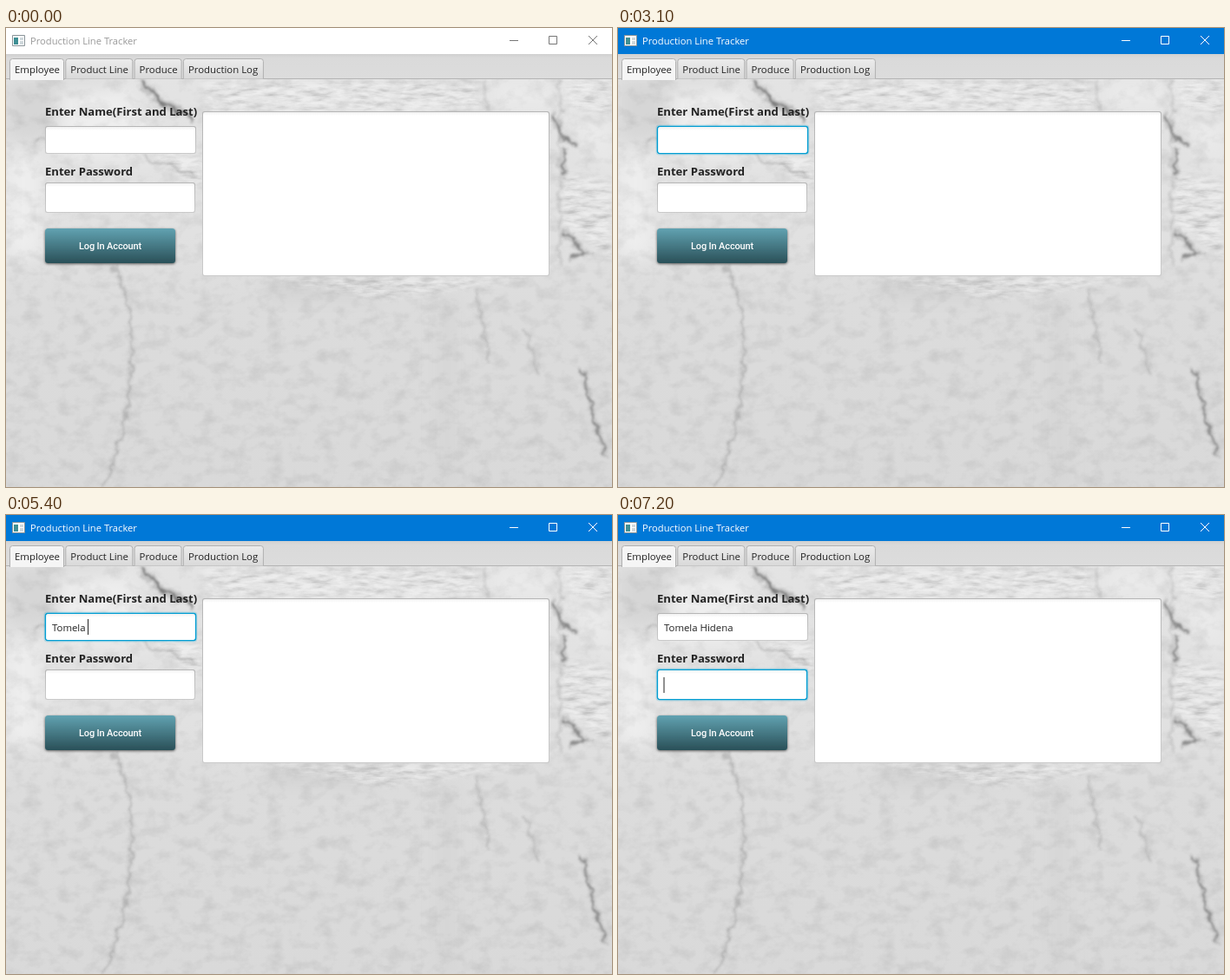
Recreate the animation shown at these times as an HTML page. Size 698 by 529 pixels, loop 8 s.

```html
<!DOCTYPE html>
<html lang="en">
<head>
<meta charset="utf-8">
<title>Production Line Tracker</title>
<style>
  html, body { margin: 0; width: 100%; height: 100%; overflow: hidden; }
  svg { display: block; }
  text { font: 11.4px "Open Sans", "Noto Sans", sans-serif; fill: #222; white-space: pre; }
  .label { font-size: 13.1px; font-weight: 700; }
  .button { font: 500 11px Roboto, sans-serif; letter-spacing: -.15px; fill: #fff; }
  #title { font-size: 11.2px; }
  .focus { display: none; fill: none; stroke: #039ed3; stroke-width: 1.4; }
  .focused .focus { display: inline; }
</style>
</head>
<body>
<svg width="698" height="529" viewBox="0 0 698 529">
  <defs>
    <linearGradient id="wall" x2="0" y2="1">
      <stop offset="0" stop-color="#e4e4e4"/><stop offset=".45" stop-color="#e1e1e1"/>
      <stop offset=".6" stop-color="#dcdcdc"/><stop offset="1" stop-color="#d9d9d9"/>
    </linearGradient>
    <linearGradient id="header" x2="0" y2="1">
      <stop offset="0" stop-color="#d0d0d0"/><stop offset=".15" stop-color="#dadada"/><stop offset="1" stop-color="#dcdcdc"/>
    </linearGradient>
    <linearGradient id="tab" x2="0" y2="1">
      <stop offset="0" stop-color="#ececec"/><stop offset="1" stop-color="#d9d9d9"/>
    </linearGradient>
    <linearGradient id="edge" x2="0" y2="1">
      <stop offset="0" stop-color="#b6b6b6"/><stop offset="1" stop-color="#cacaca"/>
    </linearGradient>
    <linearGradient id="paper" gradientUnits="userSpaceOnUse" x2="0" y2="5">
      <stop offset="0" stop-color="#eee"/><stop offset="1" stop-color="#fff"/>
    </linearGradient>
    <linearGradient id="teal" x2="0" y2="1">
      <stop offset="0" stop-color="#61a2b1"/><stop offset="1" stop-color="#2a5058"/>
    </linearGradient>
    <filter id="soft" x="-50%" y="-50%" width="200%" height="200%"><feGaussianBlur stdDeviation="10"/></filter>
    <filter id="shadow" x="-10%" y="-30%" width="120%" height="160%">
      <feDropShadow dx="0" dy="1" stdDeviation="1.8" flood-opacity=".6"/>
    </filter>
    <filter id="grain" x="0" y="0" width="1" height="1" color-interpolation-filters="sRGB">
      <feTurbulence type="fractalNoise" baseFrequency=".05 .07" numOctaves="4" seed="4"/>
      <feColorMatrix values="0 0 0 0 0  0 0 0 0 0  0 0 0 0 0  .16 0 0 0 -.07"/>
    </filter>
    <filter id="streaks" color-interpolation-filters="sRGB">
      <feTurbulence type="fractalNoise" baseFrequency=".05 .2" numOctaves="3" seed="7" result="noise"/>
      <feColorMatrix values="0 0 0 0 .98  0 0 0 0 .98  0 0 0 0 .98  5 0 0 0 -2.3" result="light"/>
      <feColorMatrix in="noise" values="0 0 0 0 .5  0 0 0 0 .5  0 0 0 0 .5  -2 0 0 0 .9" result="dark"/>
      <feMerge result="both"><feMergeNode in="dark"/><feMergeNode in="light"/></feMerge>
      <feGaussianBlur in="SourceAlpha" stdDeviation="5" result="area"/>
      <feComposite in="both" in2="area" operator="in"/>
    </filter>
    <filter id="rough" filterUnits="userSpaceOnUse" x="0" y="50" width="698" height="479">
      <feTurbulence type="fractalNoise" baseFrequency=".08" numOctaves="3" seed="2" result="noise"/>
      <feDisplacementMap in="SourceGraphic" in2="noise" scale="14" xChannelSelector="R" yChannelSelector="G"/>
      <feGaussianBlur stdDeviation=".9"/>
    </filter>
  </defs>

  <rect width="698" height="529" fill="url(#wall)"/>
  <g filter="url(#soft)">
    <path d="M0 59H130L45 130H0Z" fill="#d6d6d6"/>
    <path d="M60 70H140L180 150H60ZM0 145H40V265H0Z" fill="#eee"/>
    <path d="M300 290H430V312H300ZM502 310H514V529H502Z" fill="#d2d2d2"/>
    <path d="M560 59H632V96H560ZM640 100H698V170Z" fill="#eaeaea"/>
  </g>
  <path filter="url(#streaks)" opacity=".45"
    d="M225 62H545V96H235ZM642 60H698V98L650 90ZM640 165L698 180V268L640 225ZM290 287H620L430 312ZM170 145H226V190Z"/>
  <rect y="59" width="698" height="470" filter="url(#grain)"/>
  <g id="cracks" fill="none" stroke-linecap="round" filter="url(#rough)"></g>

  <rect id="bar" width="698" height="30"/>
  <path d="M7.5 8.5H21.5V20.5H7.5Z" fill="#fff" stroke="#8a9499"/>
  <path d="M9 11H14V19H9Z" fill="#3f8f94"/>
  <path d="M16 11H20V14H16ZM16 15H20V19H16Z" fill="#cfd8dc"/>
  <text id="title" x="28" y="19">Production Line Tracker</text>
  <path id="controls" d="M580 14.5H590M625.5 9.5H634.5V18.5H625.5ZM671 9L681 19M681 9L671 19" fill="none"/>

  <rect y="30" width="698" height="29" fill="url(#header)"/>
  <path d="M0 58.5H698" stroke="#b4b4b4"/>
  <g id="tabs"></g>

  <text class="label" x="45" y="101">Enter Name(First and Last)</text>
  <text class="label" x="45" y="170">Enter Password</text>
  <g id="fields"></g>
  <text id="typed" x="53" y="134"></text>
  <rect id="caret" width="1" height="18" fill="#222"/>

  <rect x="45" y="231" width="150" height="40" rx="3.5" fill="url(#teal)" filter="url(#shadow)"/>
  <text class="button" x="84" y="255">Log In Account</text>
</svg>
<script>
const $ = id => document.getElementById(id);

// A broad pale shadow with a thin darker core
const crack = (path, width, alpha) => [[width * 3, alpha * .35], [width, alpha]].map(([w, a]) =>
  `<path d="${path}" stroke="#555" stroke-width="${w}" opacity="${a}"/>`).join("");

$("cracks").innerHTML =
  crack("M156 64L178 84 214 105", 3, .6) +
  crack("M630 100L640 124 654 134M644 142L642 170", 2.5, .5) +
  crack("M644 236L668 258 652 264", 3, .5) +
  crack("M664 396L672 430 690 490", 2.5, .45) +
  crack("M125 275Q150 320 143 400T112 528", 2, .2) +
  crack("M540 300L558 385M596 345L614 400M638 60V270M552 60V95", 1.5, .15) +
  crack("M30 130L120 134 218 170", 2, .2);

let tabX = 4;
$("tabs").innerHTML = ["Employee", "Product Line", "Produce", "Production Log"].map((label, i) => {
  const width = [63, 78, 55, 93][i], bottom = i ? 58.5 : 60, x = tabX;
  tabX += width + 1.3;
  return `<path d="M${x + .5} ${bottom}V38.5q0-3 3-3h${width - 7}q3 0 3 3V${bottom}"
    fill="${i ? "url(#tab)" : "#f5f5f5"}" stroke="#b0b0b0"/><text x="${x + 6}" y="52">${label}</text>`;
}).join("");

const box = (id, x, y, w, h) => `<g id="${id}" transform="translate(${x} ${y})">
  <rect width="${w}" height="${h}" rx="2.5" fill="url(#edge)"/>
  <rect x="1" y="1" width="${w - 2}" height="${h - 2}" rx="2" fill="url(#paper)"/>
  <rect class="focus" x="-.7" y="-.7" width="${w + 1.4}" height="${h + 1.4}" rx="3" opacity=".2"/>
  <rect class="focus" x=".4" y=".4" width="${w - .8}" height="${h - .8}" rx="2.5"/></g>`;
$("fields").innerHTML = box("name", 45, 113, 174, 32) + box("password", 45, 178, 173, 35)
  + box("list", 226, 96, 400, 190);

const LOOP = 8000, ACTIVATE = 1200, NEXT_FIELD = 7100;
const NAME = "Tomela Hidena";
// Times in units of 100 ms: one per letter typed, one per caret toggle
const keyTimes = [32, 37, 39, 41, 43, 45, 54, 59, 61, 61, 64, 65, 66];
const blinkTimes = [13, 17, 22, 31, 32, 37, 38, 49, 54, 71, 72];
const passed = (times, t) => times.filter(time => time * 100 <= t).length;

function draw(t) {
  const active = t >= ACTIVATE, onPassword = t >= NEXT_FIELD;
  $("bar").setAttribute("fill", active ? "#0078d7" : "#fff");
  $("title").style.fill = active ? "#fff" : "#999";
  $("controls").setAttribute("stroke", active ? "#fff" : "#777");
  $("name").classList.toggle("focused", active && !onPassword);
  $("password").classList.toggle("focused", onPassword);

  const typed = $("typed"), caret = $("caret"), count = passed(keyTimes, t);
  typed.textContent = NAME.slice(0, count);
  const advance = onPassword || !count ? 0 : typed.getComputedTextLength();
  caret.setAttribute("x", 52.5 + advance);
  caret.setAttribute("y", onPassword ? 187 : 120);
  caret.setAttribute("opacity", passed(blinkTimes, t) % 2);
}

const start = performance.now();
function tick() {
  draw((performance.now() - start) % LOOP);
  requestAnimationFrame(tick);
}
tick();
</script>
</body>
</html>
```
